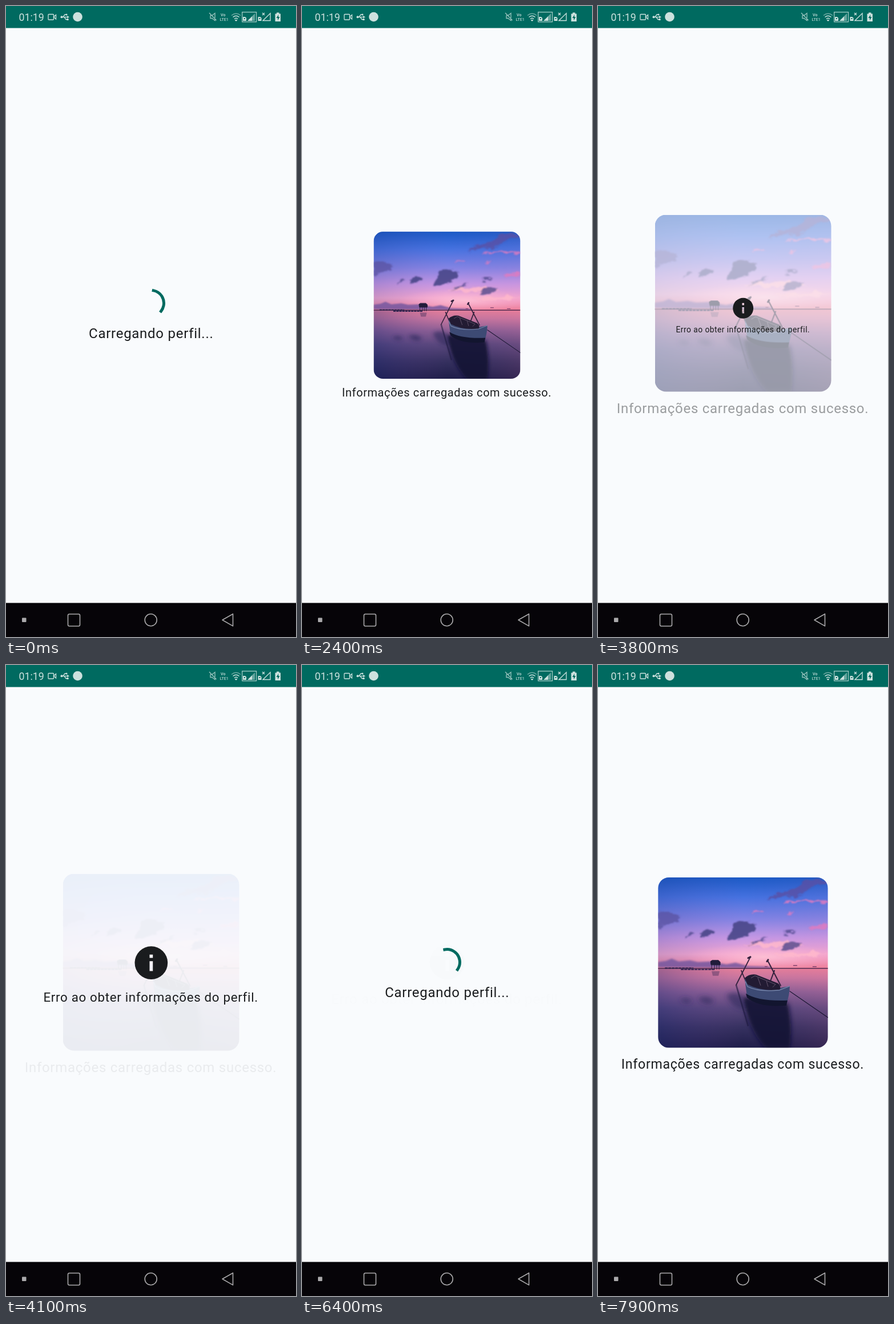
Recreate the animation shown at these times as an HTML page. Size 508 px wide and 1102 px high, loop 8 s.

```html
<!DOCTYPE html>
<html lang="pt">
<head>
<meta charset="utf-8">
<title>Carregando perfil</title>
<style>
  html, body { margin: 0; width: 100%; height: 100%; overflow: hidden; background: #f9fbfd; }
  svg { display: block; width: 100vw; height: 100vh; }
  text { font-family: Roboto, sans-serif; }
  .label { font-size: 24px; letter-spacing: .73px; text-anchor: middle; fill: #1a1c1e; }
  .line { fill: none; stroke: #cde1de; stroke-width: 1.3; }
  .nav { fill: none; stroke: #aaa9ab; stroke-width: 1.6; stroke-linejoin: round; }
</style>
</head>
<body>
<svg viewBox="0 0 508 1102">
  <defs>
    <linearGradient id="sky" x2="0" y2="1">
      <stop offset="0" stop-color="#1b5ac6"/>
      <stop offset=".22" stop-color="#4672e0"/>
      <stop offset=".46" stop-color="#8484e4"/>
      <stop offset=".66" stop-color="#c698e4"/>
      <stop offset=".84" stop-color="#f3a9d2"/>
      <stop offset="1" stop-color="#ee8098"/>
    </linearGradient>
    <linearGradient id="water" x2="0" y2="1">
      <stop offset="0" stop-color="#e8809a"/>
      <stop offset=".12" stop-color="#c9779f"/>
      <stop offset=".3" stop-color="#8b5f94"/>
      <stop offset=".5" stop-color="#58477c"/>
      <stop offset=".75" stop-color="#35305f"/>
      <stop offset="1" stop-color="#1f1e49"/>
    </linearGradient>
    <linearGradient id="side">
      <stop offset="0" stop-color="#1c2a78" stop-opacity=".34"/>
      <stop offset=".5" stop-color="#7a4aa0" stop-opacity="0"/>
      <stop offset="1" stop-color="#e86a9a" stop-opacity=".12"/>
    </linearGradient>
    <radialGradient id="glow">
      <stop offset="0" stop-color="#ffc4d6" stop-opacity=".85"/>
      <stop offset="1" stop-color="#ffb0d0" stop-opacity="0"/>
    </radialGradient>
    <filter id="soft" x="-20%" y="-20%" width="140%" height="140%"><feGaussianBlur stdDeviation="1.5"/></filter>
    <filter id="mist" x="-30%" y="-30%" width="160%" height="160%"><feGaussianBlur stdDeviation="4"/></filter>
    <filter id="ragged" x="-10%" y="-10%" width="120%" height="120%">
      <feTurbulence type="fractalNoise" baseFrequency=".06 .1" numOctaves="3" seed="4"/>
      <feDisplacementMap in="SourceGraphic" scale="15" xChannelSelector="R" yChannelSelector="G"/>
      <feGaussianBlur stdDeviation="1.1"/>
    </filter>
    <clipPath id="frame"><rect width="298" height="298" rx="19"/></clipPath>
  </defs>

  <rect width="508" height="1102" fill="#f9fbfd"/>

  <g id="stage">
    <g id="success">
      <g transform="translate(99.5 364.5) scale(1.0369)" clip-path="url(#frame)">
        <rect width="298" height="160" fill="url(#sky)"/>
        <rect width="298" height="160" fill="url(#side)" opacity=".5"/>
        <rect y="159" width="298" height="139" fill="url(#water)"/>
        <rect y="159" width="298" height="139" fill="url(#side)"/>
        <ellipse cx="185" cy="139" rx="135" ry="24" fill="url(#glow)"/>

        <g filter="url(#ragged)">
          <g fill="#e07cc0" opacity=".85">
            <path d="M215 44Q250 38 298 40V45Q250 44 215 44ZM166 59l18-2 4 4-20 1ZM226 63l12-5-4 7ZM264 90q18-9 34-7v8q-20 0-34-1Z"/>
            <path d="M150 116l50-5 60 8-80 3ZM200 136l70-6 28 4-50 5Z" fill="#ffb9cc"/>
          </g>
          <path d="M188 39q18-14 36-10 22-22 74-27v7q-36 9-52 22-24 4-58 8Z" fill="#5a50a4" opacity=".8"/>
          <path d="M0 61q14-5 22 4 14 0 20 7-10 7-24 10L0 88Z" fill="#5a52a0" opacity=".75"/>
          <g fill="#4a4588" opacity=".9">
            <path d="M125 108q-2-10 4-16-2-13 13-14 12-5 20 2 10 0 10 6 3 2 1 5-9 5-18 9-14 11-30 8Z"/>
            <path d="M74 104q-1-9 9-11 9-2 15 3-10 8-24 8Z"/>
            <path d="M47 106l7-6q6-4 11-2-5 7-18 8Z" opacity=".8"/>
            <path d="M214 124q7-7 15-7 10-7 24-1-9 7-21 6-8 4-18 2ZM218 98l11-5 10 3-10 3ZM158 118l12-6 10-3 12-5-16 11Z" opacity=".85"/>
          </g>
        </g>
        <path d="M0 157V148l14-2 10-4 12 5 20-2 14 3 20-1 30 5 16-3 22 6 40 1v3Z" fill="#7459a0" opacity=".85" filter="url(#soft)"/>
        <g filter="url(#mist)">
          <path d="M70 212q16-8 28 4-10 12-28-4ZM38 214q12-6 22 2-10 8-22-2ZM120 205q20-8 30 4l10 22q-30 2-40-26Z" fill="#2f2a60" opacity=".65"/>
          <path d="M150 208L228 220q8 34 3 78H188Q154 260 150 208Z" fill="#131434" opacity=".8"/>
        </g>
        <path d="M152 212l74 10q8 40 4 76H192Q158 255 152 212Z" fill="#131434" opacity=".6" filter="url(#soft)"/>

        <path d="M0 159H298" stroke="#512b50" stroke-width="1.5"/>
        <path d="M12 158.500H62M40 161H100" stroke="#2f2450" stroke-width="2.2" stroke-dasharray="5 1"/>
        <path d="M92 147l3-2h11l3 3v5H93ZM94 153v8M99 153v8M103 153v8M107 153v8" fill="#211c3b" stroke="#211c3b"/>
        <path d="M94 164h14l-2 8H96Z" fill="#3b2c58" opacity=".4"/>
        <path d="M237 154h7M187 156h5M271 156h7" stroke="#83436f" stroke-width="1.6"/>

        <path d="M137 188L158 260" stroke="#1d193e" stroke-width="2.5" opacity=".65"/>
        <g fill="none" stroke="#33213d" stroke-linecap="round">
          <path d="M162 139L137 188M146 163l10 24" stroke-width="1.8"/>
          <path d="M192 145L215 189M204 163l-8 21" stroke-width="2"/>
          <path d="M158 141l4-2M191 147l2-3" stroke-width="3"/>
          <path d="M231 199L298 245" stroke="#1e1936" stroke-width="1.2"/>
        </g>
        <path d="M152 177l4 31q12 8 30 12 24 4 39 2 6-18 6-32l-16 3q-32 5-63-16Z" fill="#3d4a74"/>
        <path d="M154 203q22 14 73 12l-2 9q-48 4-69-14Z" fill="#12152f"/>
        <path d="M152 176q9-8 20-6l38 15q6 4 4 11-32 4-57-9Z" fill="#221b33"/>
        <path d="M153 182l4 9q20 10 56 6l18-7" fill="none" stroke="#7583a8" stroke-width="1.4"/>
        <path d="M163 176l7-4 36 15-5 5M175 175l5 14M190 181l3 10" fill="none" stroke="#66566f"/>
      </g>
      <text class="label" x="253.500" y="711">Informações carregadas com sucesso.</text>
    </g>

    <g id="failure">
      <path fill="#1a1c1e" fill-rule="evenodd" d="M223.4 518.6a31 31 0 0 1 62 0a31 31 0 0 1-62 0ZM251.3 503.1h6.2v6.2h-6.2ZM251.3 515.5h6.2v18.6h-6.2Z"/>
      <text class="label" x="253.600" y="592">Erro ao obter informações do perfil.</text>
    </g>

    <g id="loading">
      <circle id="spinner" cx="254" cy="519" r="22.5" pathLength="360" fill="none" stroke="#006a60" stroke-width="5" stroke-linecap="square"/>
      <text class="label" x="254.300" y="580">Carregando perfil...</text>
    </g>
  </g>

  <rect width="508" height="38.500" fill="#006a60"/>
  <g fill="#cde1de">
    <text x="22.5" y="26" font-size="17.8">01:19</text>
    <rect class="line" x="74" y="14.5" width="9.5" height="9.5" rx="1"/>
    <path class="line" d="M83.5 19l4-3.5v7.5Z"/>
    <path class="line" d="M97 19.3h12M100 19l3-4h3M102 19.5l3 4h3"/>
    <circle cx="97.5" cy="19.3" r="2"/><circle cx="106" cy="15" r="1.5"/>
    <path d="M107 17l4 2.3-4 2.3ZM106.5 22h3v3h-3Z"/>
    <circle cx="125.5" cy="19" r="8.3"/>
    <path class="line" d="M356 12l12.5 13M358 16.5h3l5-4v8.5M358 16.5v5h3l5 4v-3" stroke-opacity=".75"/>
    <g opacity=".85">
      <text x="376" y="18" font-size="7" font-weight="700">Vo</text>
      <text x="374.5" y="25.5" font-size="7" font-weight="500">LTE1</text>
    </g>
    <path class="line" d="M395 16.5q8-6.5 16 0" opacity=".55"/>
    <path class="line" d="M397.5 19.5q5.5-4.5 11 0M400 22.5q3-2.5 6 0"/>
    <path d="M400.5 24h5l-2.5 3Z"/>
    <rect class="line" x="413.7" y="10.7" width="24.8" height="17" stroke-opacity=".8"/>
    <path d="M415 19h4l2 2v5h-6ZM423 26l8-8v8Z"/>
    <path d="M431 18l5-5v13h-5Z" opacity=".5"/>
    <path d="M441.5 19h4l2 2v5h-6Z"/>
    <path class="line" d="M450 25.5L463 12.7V25.5ZM449 12l4 4M453 12l-4 4"/>
    <path d="M474 11.5h4.5v2h2.5v13.5h-9.5V13.5h2.5Z"/>
    <path d="M477.5 15l-4 6h2.5v4l3.5-6h-2.5Z" fill="#006a60"/>
    <path d="M417 22h2M443.5 22h2" stroke="#006a60" stroke-width="2"/>
  </g>

  <rect y="1042.5" width="508" height="59.5" fill="#060408"/>
  <rect x="28" y="1068.5" width="7.5" height="7.5" rx="1" fill="#aaa9ab"/>
  <rect class="nav" x="108.5" y="1062" width="21" height="21" rx="2.5"/>
  <circle class="nav" cx="253.7" cy="1072.3" r="10.5"/>
  <path class="nav" d="M379 1072.3L397.5 1061.7V1082.9Z"/>
</svg>

<script>
const LOOP = 8000, STEP = 100, FADE = 1000;
const byId = id => document.getElementById(id);
const stage = byId('stage'), spinner = byId('spinner');
const scenes = { loading: byId('loading'), success: byId('success'), failure: byId('failure') };

const changes = [
  { at: -2000, from: 'success', to: 'loading', spin: -926 },
  { at: 1850, from: 'loading', to: 'success', spin: -926 },
  { at: 3416, from: 'success', to: 'failure', spin: 0 },
  { at: 5460, from: 'failure', to: 'loading', spin: 5492 },
  { at: 7139, from: 'loading', to: 'success', spin: 5492 },
];

// cubic-bezier(.4, 0, .2, 1), solved by bisection
function ease(x) {
  if (x <= 0) return 0;
  if (x >= 1) return 1;
  let low = 0, high = 1, s = .5;
  for (let i = 0; i < 24; i++) {
    s = (low + high) / 2;
    const guess = 1.2 * s * (1 - s) ** 2 + .6 * s * s * (1 - s) + s ** 3;
    if (guess < x) low = s; else high = s;
  }
  return 3 * s * s * (1 - s) + s ** 3;
}

function drawSpinner(time) {
  const turns = Math.max(0, time) / 1332;
  const cycle = Math.floor(turns), phase = turns - cycle;
  const head = 290 * ease(phase * 2), tail = 290 * ease(phase * 2 - 1);
  const start = tail - 90 + cycle * 216 + phase * 286;
  spinner.setAttribute('stroke-dasharray', `${Math.max(.1, head - tail)} 360`);
  spinner.setAttribute('transform', `rotate(${start % 360} 254 519)`);
}

function pose(scene, scale, opacity) {
  scene.style.display = scale > 0 && opacity > 0 ? '' : 'none';
  scene.setAttribute('opacity', opacity);
  scene.setAttribute('transform', `translate(254 540.5) scale(${scale}) translate(-254 -540.5)`);
}

function draw(t) {
  const { at, from, to, spin } = changes.filter(c => c.at <= t).pop();
  const p = ease((t - at) / FADE);
  for (const name in scenes) {
    if (name === to) pose(scenes[name], p, 1);
    else pose(scenes[name], 1, name === from ? 1 - p : 0);
  }
  if (stage.lastElementChild !== scenes[to]) stage.append(scenes[to]);
  drawSpinner(t - spin);
}

function tick(now) {
  draw(Math.floor(now % LOOP / STEP) * STEP);
  requestAnimationFrame(tick);
}
draw(0);
requestAnimationFrame(tick);
</script>
</body>
</html>
```
